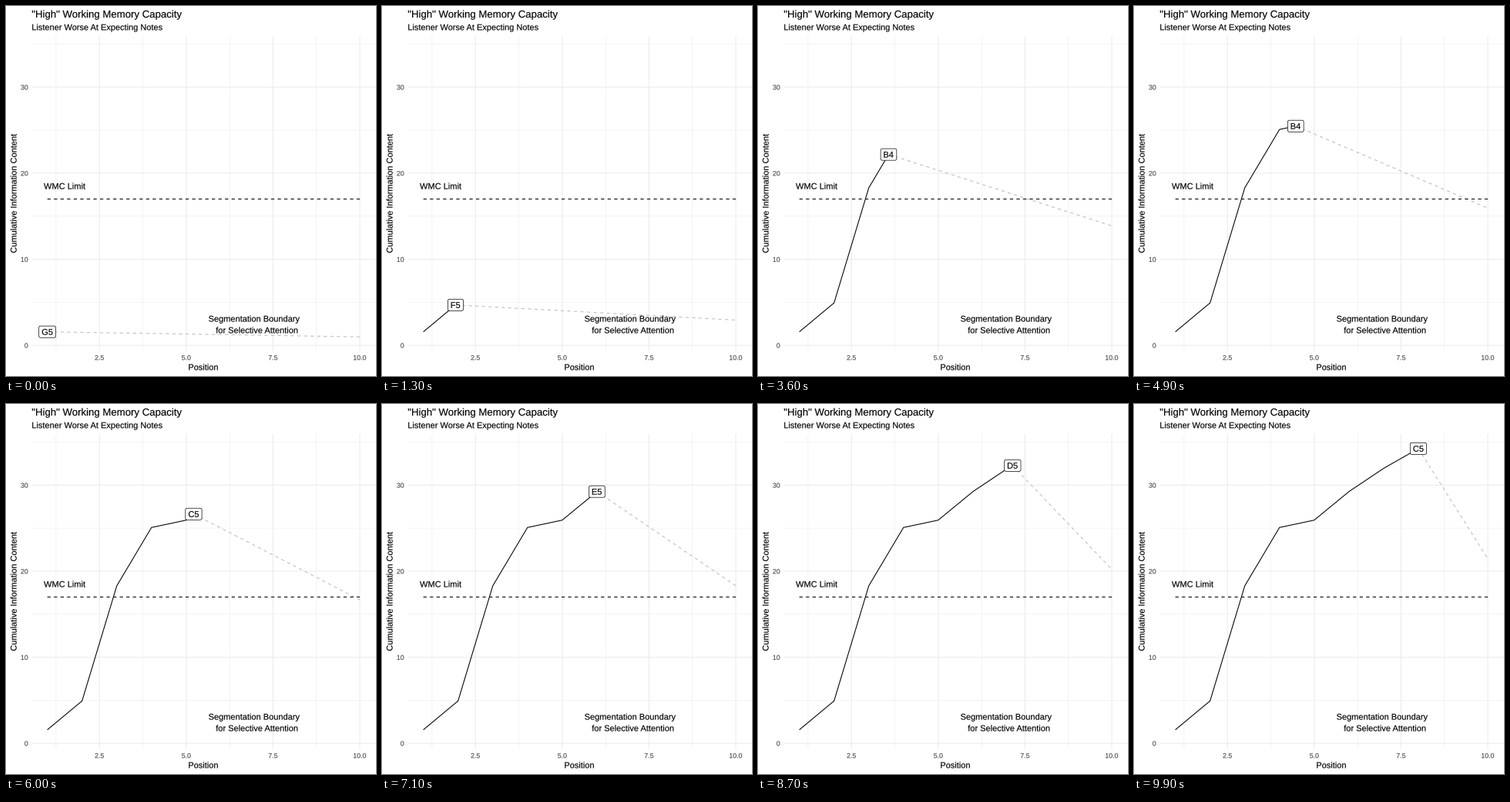
Recreate the animation shown at these times as a matplotlib script. Size 480 by 480 pixels, loop 10000 ms.

```python
import numpy as np
import matplotlib.pyplot as plt
from matplotlib.animation import FuncAnimation
from matplotlib.patches import FancyBboxPatch, PathPatch
from matplotlib.textpath import TextPath
from matplotlib.transforms import Affine2D

plt.rcParams.update({
    "font.family": "Liberation Sans",
    "lines.dash_capstyle": "butt",
    "lines.solid_capstyle": "butt",
    "lines.solid_joinstyle": "round",
})

SIZE, DPI = 480, 72          # at 72 dpi one point is one pixel
FRAMES, INTERVAL = 100, 100
LEFT, RIGHT, TOP, BOTTOM = 33.3, 479.5, 38.8, 447.8
THICK, THIN = 1.067, 0.533
BODY = 11.04
DASHED = (0, (4, 4))
DECAY = 0.626

NOTES = ["G5", "F5", "D5", "B4", "C5", "E5", "D5", "C5"]
CONTENT = np.array([1.57, 4.93, 18.3, 25.08, 25.93, 29.25, 31.95, 34.25])
POSITION = np.arange(1, 9)
STOPS = np.round((FRAMES - 1) * np.arange(8) / 7)
ADVANCE = {"B": 0.667, "C": 0.722, "D": 0.722, "E": 0.667, "F": 0.611, "G": 0.778}


def px(x):
    return 459.0 - (10 - np.asarray(x)) * 45.04


def py(y):
    return 440.2 - np.asarray(y) * 11.165


fig = plt.figure(figsize=(SIZE / DPI, SIZE / DPI), dpi=DPI, facecolor="white")
ax = fig.add_axes([0, 0, 1, 1])
ax.set_xlim(0, SIZE)
ax.set_ylim(SIZE, 0)
ax.axis("off")


def stroke(xs, ys, color="black", lw=THICK, z=2, **kw):
    line, = ax.plot(xs, ys, color=color, lw=lw, zorder=z, **kw)
    line.set_snap(False)
    return line


def outline(x, y, s, size=BODY, ha="center", angle=0):
    """Glyph outlines with their baseline at (x, y), free of pixel rounding."""
    path = TextPath((0, 0), s, size=size)
    ink = path.get_extents()
    anchor = {"left": 0, "center": (ink.x0 + ink.x1) / 2, "right": ink.x1}[ha]
    place = Affine2D().translate(-anchor, 0).rotate_deg(angle)
    return place.scale(1, -1).translate(x, y).transform_path(path)


def write(x, y, s, size=BODY, ha="center", color="black", angle=0, z=5):
    patch = PathPatch(outline(x, y, s, size, ha, angle), fc=color, ec=color,
                      lw=0.15, zorder=z, snap=False)
    return ax.add_patch(patch)


def grid(xs, ys, lw):
    for x in px(xs):
        stroke([x, x], [TOP, BOTTOM], "#EBEBEB", lw, z=1)
    for y in py(ys):
        stroke([LEFT, RIGHT], [y, y], "#EBEBEB", lw, z=1)


x_ticks = [2.5, 5, 7.5, 10]
y_ticks = [0, 10, 20, 30]
grid([1.25, 3.75, 6.25, 8.75], [5, 15, 25, 35], THIN)
grid(x_ticks, y_ticks, THICK)
for v in x_ticks:
    write(px(v), 459.2, f"{v:.1f}", 8.8, color="#4D4D4D")
for v in y_ticks:
    write(28.4, py(v) + 3.3, str(v), 8.8, "right", "#4D4D4D")

write(33.3, 15, '"High" Working Memory Capacity', 13.2, "left")
write(33.3, 31.3, "Listener Worse At Expecting Notes", 11, "left")
write(256, 472.3, "Position", 11)
write(13.6, 243, "Cumulative Information Content", 11, angle=90)
write(76, 237.5, "WMC Limit")
write(322, 409.5, "Segmentation Boundary")
write(325.3, 424.4, "for Selective Attention")

stroke(px([1, 10]), py([17, 17]), ls=DASHED, z=4)
trail = stroke([], [], z=3)
boundary = stroke([], [], "#BEBEBE", ls=DASHED, z=2)
box = FancyBboxPatch((0, 0), 1, 1, boxstyle="round,pad=0,rounding_size=2.16",
                     fc="white", ec="black", lw=0.7, zorder=6, snap=False)
ax.add_patch(box)
note = write(0, 0, NOTES[0], z=7)


def update(n):
    x = np.interp(n, STOPS, POSITION)
    y = np.interp(x, POSITION, CONTENT)
    past = POSITION < x
    trail.set_data(px(np.append(POSITION[past], x)),
                   py(np.append(CONTENT[past], y)))
    boundary.set_data(px([x, 10]), py([y, DECAY * y]))

    # the name switches halfway between two notes
    name = NOTES[int(x - 0.5)]
    w, h = (ADVANCE[name[0]] + 0.556) * BODY + 7.2, 15.1
    cx, cy = px(x), py(y)
    box.set_bounds(cx - w / 2, cy - h / 2, w, h)
    note.set_path(outline(cx, cy + 3.95, name))
    return trail, boundary, box, note


anim = FuncAnimation(fig, update, frames=FRAMES, interval=INTERVAL,
                     repeat=True, repeat_delay=0, blit=False)
plt.show()
```
